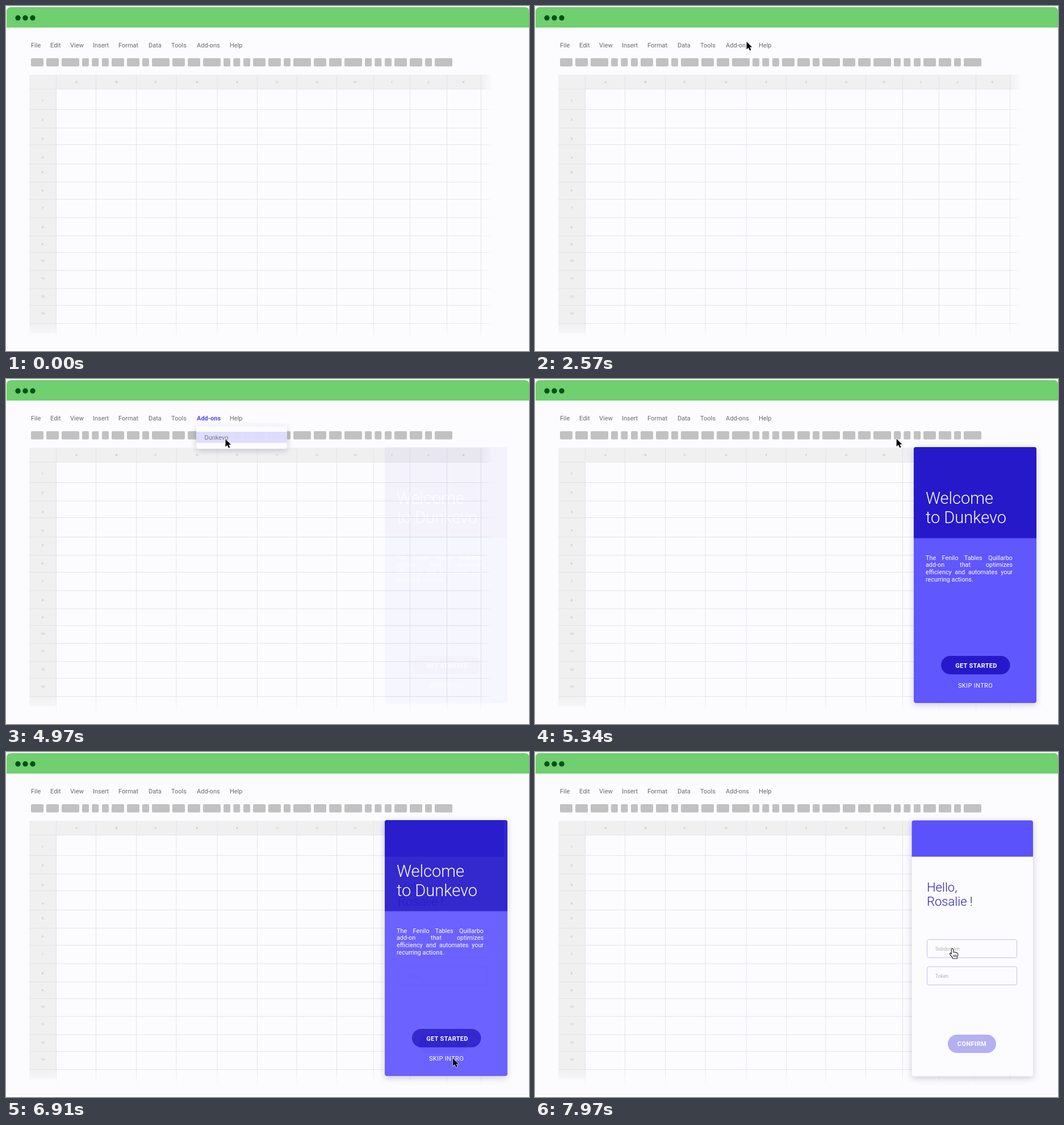
Write an HTML page that moves like this. It is 921x608 px and loops after 8 s.

```html
<!DOCTYPE html>
<html lang="en">
<head>
<meta charset="utf-8">
<title>Spreadsheet add-on</title>
<style>
  html, body { margin: 0; width: 100%; height: 100%; overflow: hidden; background: #fff; }
  svg { display: block; width: 100%; height: 100%; font: 11px Roboto, sans-serif; }
  .label { font-size: 6px; fill: #b4b4b8; text-anchor: middle; }
  .grid { stroke: #e4e4ea; }
  .light { font-weight: 300; }
  .button { font-weight: 700; fill: #fff; text-anchor: middle; }
  .hint { font-size: 8.5px; fill: #b0b0b8; }
  .shadow { filter: drop-shadow(0 3px 6px rgba(0, 0, 40, .2)); }
  #panels { isolation: isolate; }
  #hello { mix-blend-mode: plus-lighter; }
  #copy { font-size: 10.8px; line-height: 12.8px; color: #fff; }
  #copy div { text-align: justify; text-align-last: justify; white-space: nowrap; }
  #copy div:last-child { text-align-last: left; }
</style>
</head>
<body>
<svg viewBox="0 0 921 608">
  <defs>
    <linearGradient id="fadeRight">
      <stop stop-color="#fcfcfe" stop-opacity="0"/><stop offset="1" stop-color="#fcfcfe"/>
    </linearGradient>
    <linearGradient id="fadeDown" x2="0" y2="1">
      <stop stop-color="#fcfcfe" stop-opacity="0"/><stop offset="1" stop-color="#fcfcfe"/>
    </linearGradient>
  </defs>

  <rect x="1" y="2" width="920" height="602" rx="8" fill="#fcfcfe" stroke="#f5f5f6"/>
  <path d="M1 38V10Q1 2 9 2H914Q921 2 921 9V38Z" fill="#70cf6f"/>
  <g fill="#00501c">
    <circle cx="21" cy="21" r="4.7"/><circle cx="34" cy="21" r="4.7"/><circle cx="47" cy="21" r="4.7"/>
  </g>
  <g id="menu" fill="#6b6b6b"></g>
  <g id="toolbar" fill="#c1c1c1"></g>
  <g id="sheet"></g>
  <rect x="836" y="120" width="22" height="470" fill="url(#fadeRight)"/>
  <rect x="40" y="559" width="820" height="29" fill="url(#fadeDown)"/>

  <g id="dropdown">
    <path class="shadow" d="M335 83H495V119Q495 123 491 123H339Q335 123 335 119Z" fill="#fdfdfe"/>
    <rect x="335" y="93" width="160" height="19.500" fill="#dfddff"/>
    <text x="349.500" y="106.500" fill="#777783">Dunkevo</text>
  </g>

  <g id="panels">
    <g id="welcome">
      <rect class="shadow" x="667" y="120" width="216" height="451" rx="4" fill="#6057ff"/>
      <path d="M667 280.500V124Q667 120 671 120H879Q883 120 883 124V280.500Z" fill="#2519c9"/>
      <g class="light" font-size="29" fill="#fff">
        <text x="688" y="220">Welcome</text><text x="688" y="253.500">to Dunkevo</text>
      </g>
      <foreignObject x="688" y="309.500" width="153" height="60">
        <div id="copy">
          <div>The Fenilo Tables Quillarbo</div>
          <div>add-on that optimizes</div>
          <div>efficiency and automates your</div>
          <div>recurring actions.</div>
        </div>
      </foreignObject>
      <rect x="715" y="488" width="121.500" height="32.500" rx="16.250" fill="#2519c9"/>
      <text class="button" x="777" y="508.500" letter-spacing=".3">GET STARTED</text>
      <text x="775.500" y="543.500" fill="#fff" text-anchor="middle" letter-spacing=".35">SKIP INTRO</text>
    </g>
    <g id="hello">
      <rect class="shadow" x="663.500" y="120.500" width="213.500" height="451" rx="4" fill="#fcfcfe"/>
      <path d="M663.500 184.500V124.500Q663.500 120.500 667.500 120.500H873Q877 120.500 877 124.500V184.500Z" fill="#5b52fc"/>
      <g class="light" font-size="22" fill="#2a1cba">
        <text x="690" y="245.500">Hello,</text><text x="690" y="271">Rosalie !</text>
      </g>
      <g fill="none" stroke="#c2bef6">
        <rect x="690.500" y="330.500" width="158" height="32" rx="3"/>
        <rect x="690.500" y="378.500" width="158" height="32" rx="3"/>
      </g>
      <text class="hint" x="705" y="350">Subdomain</text>
      <text class="hint" x="705" y="397.500">Token</text>
      <rect x="727" y="498" width="85" height="32.500" rx="16.250" fill="#b5b0f2"/>
      <text class="button" x="769.500" y="517.500" letter-spacing=".4">CONFIRM</text>
    </g>
  </g>

  <g id="cursor" stroke-linejoin="round">
    <path id="arrow" d="M0 0V13.500L3.200 10.600L5.600 15.500L7.900 14.400L5.600 9.700H9.800Z" stroke="#fff" stroke-width="1.200" paint-order="stroke"/>
    <g id="hand" transform="translate(-2 -1)" fill="#fff" stroke="#222" stroke-width="1.100">
      <path d="M-1.600 9L-1.900 1.200Q-1.700-.6 0-.5Q1.500-.4 1.600 1.200L2 6Q3.800 4.800 5 6.300Q7 5.600 7.900 7.200Q9.800 7 9.900 9Q10 12 8.300 14.400V17H.4L.2 15Q-2 13-4.300 9.600Q-5.300 7.800-3.600 7.400Q-2.400 7.600-1.600 9Z"/>
      <path d="M2.400 10.500V14M4.600 10.500V14M6.800 10.500V14"/>
    </g>
  </g>
</svg>
<script>
const LOOP = 8000;
const $ = id => document.getElementById(id);
const clamp = v => Math.max(0, Math.min(1, v));
const progress = (t, start, end) => clamp((t - start) / (end - start));
const smooth = u => u * u * (3 - 2 * u);

const menu = { File: 44, Edit: 78, View: 113, Insert: 153, Format: 198, Data: 251, Tools: 291, 'Add-ons': 336, Help: 394 };
$('menu').innerHTML = Object.entries(menu)
  .map(([name, x]) => `<text id="menu-${name}" x="${x}" y="73">${name}</text>`).join('');

const blocks = [[0, 22], [27, 22], [54, 31], [90, 12], [107.3, 12], [125, 12], [142, 22], [169, 22], [196, 12], [213, 31]];
$('toolbar').innerHTML = [44, 293, 542].flatMap(start => blocks.map(([x, width]) =>
  `<rect x="${start + x}" y="92" width="${width}" height="14.5" rx="2"/>`)).join('');

const columns = [88.5, 158.5, 229.5, 300, 372, 442.5, 512, 582.5, 647.5, 711.5, 776.5, 836.5];
const rows = [146.5, 182.5, 215, 244.5, 278.5, 310.5, 340.5, 373, 405, 434.5, 466, 498, 527.5, 559.5];
const columnLabels = [124, 194.5, 263.5, 336.5, 407.5, 478, 548, 615, 679.5, 743.5, 806];
const rowLabels = [167, 199.5, 233.5, 267, 293, 324.5, 355.5, 389.5, 419.5, 449, 479.5, 511.5, 542];
const label = (x, y, text) => `<text class="label" x="${x}" y="${y + 2.2}">${text}</text>`;
$('sheet').innerHTML =
  '<path d="M41 577V124Q41 121 44 121H855V146.500H88.500V577Z" fill="#f0f0f1"/>' +
  `<path class="grid" d="${columns.map(x => `M${x} 121V588`).join('')}${rows.map(y => `M41 ${y}H857`).join('')}"/>` +
  columnLabels.map((x, i) => label(x, 133.5, String.fromCharCode(65 + i))).join('') +
  rowLabels.map((y, i) => label(64.5, y, i + 1)).join('');

// Each move: start time, end time, destination, optional curve control point.
const origin = [560, 625];
const moves = [
  [500, 1430, [371.5, 62]],
  [2500, 3540, [455, 128]],
  [3540, 4200, [358, 67]],
  [4550, 4900, [386.5, 106]],
  [4990, 5798, [787, 540], [772, -41]],
  [7050, 7800, [737, 348]]
];

function cursorAt(t) {
  let from = origin;
  for (const [start, end, to, control] of moves) {
    if (t < start) break;
    const s = smooth(progress(t, start, end));
    const mid = control || from.map((v, i) => (v + to[i]) / 2);
    from = from.map((v, i) => v * (1 - s) ** 2 + 2 * mid[i] * s * (1 - s) + to[i] * s * s);
  }
  return from;
}

function fade(id, opacity) {
  $(id).style.opacity = opacity;
  $(id).style.visibility = opacity > 0 ? 'visible' : 'hidden';
}

function draw(now) {
  const t = now % LOOP;
  const panel = progress(t, 4960, 5260);
  const hello = progress(t, 6890, 7190);
  const menuOpen = t >= 4350 && t < 5110;

  fade('dropdown', progress(t, 4350, 4500) * (1 - panel));
  fade('welcome', panel * (1 - hello));
  fade('hello', hello);
  $('menu-Add-ons').setAttribute('fill', menuOpen ? '#5548ee' : '#6b6b6b');
  $('menu-Add-ons').setAttribute('font-weight', menuOpen ? 700 : 400);

  const pointing = t >= 7700;
  $('arrow').style.display = pointing ? 'none' : '';
  $('hand').style.display = pointing ? '' : 'none';
  $('cursor').setAttribute('transform', `translate(${cursorAt(t)})`);
  requestAnimationFrame(draw);
}
requestAnimationFrame(draw);
</script>
</body>
</html>
```
